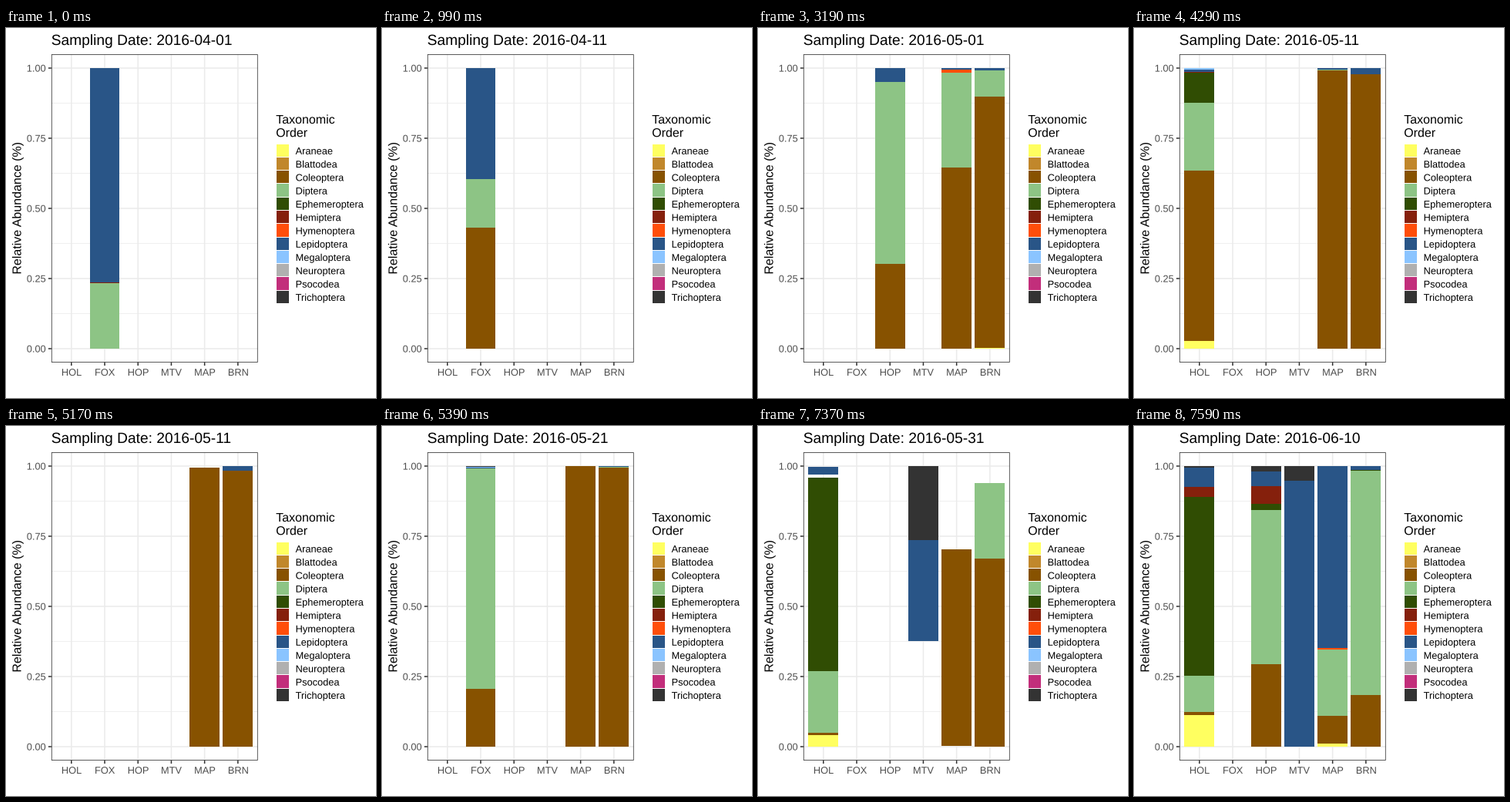
A matplotlib script for the animation above (8000 ms loop, 480 by 480 pixels).

```python
from math import floor

import matplotlib.pyplot as plt
from matplotlib.animation import FuncAnimation
from matplotlib.collections import PolyCollection
from matplotlib.patches import PathPatch, Rectangle
from matplotlib.textpath import TextPath
from matplotlib.transforms import Affine2D

SIZE, DPI = 480, 72          # at 72 dpi one point is one pixel
LOOP, INTERVAL = 8000, 20    # ms
STEP = 110                   # ms per animation step
HOLD, CYCLE = 8, 10          # steps at rest, steps per date

LEFT, RIGHT, TOP, BOTTOM = 58.9, 326.7, 34, 434
Y0, Y_SPAN = 416, 364
X0, PITCH = 84.84, 43.2
SITES = ["HOL", "FOX", "HOP", "MTV", "MAP", "BRN"]

ORDERS = {
    "A": ("Araneae", "#FFFF60"),
    "B": ("Blattodea", "#C1872B"),
    "C": ("Coleoptera", "#875200"),
    "D": ("Diptera", "#8DC485"),
    "E": ("Ephemeroptera", "#304D03"),
    "H": ("Hemiptera", "#85200C"),
    "Y": ("Hymenoptera", "#FF4E0A"),
    "L": ("Lepidoptera", "#295587"),
    "M": ("Megaloptera", "#8AC4FF"),
    "N": ("Neuroptera", "#B0B0B0"),
    "P": ("Psocodea", "#C22E7B"),
    "T": ("Trichoptera", "#333333"),
}

# Cumulative top of each stacked order, per site
SAMPLES = [
    ("2016-04-01", dict(FOX=dict(D=.2335, H=.2375, L=1))),
    ("2016-04-11", dict(FOX=dict(C=.43, D=.605, L=1))),
    ("2016-04-21", dict(
        FOX=dict(C=.86, D=.975, E=.978, L=1),
        MAP=dict(C=.041, D=.5907, L=1),
        BRN=dict(C=.033, D=.236, H=.2445, L=1))),
    ("2016-05-01", dict(
        HOP=dict(C=.302, D=.9505, L=1),
        MAP=dict(C=.6456, D=.9835, Y=.9945, L=1),
        BRN=dict(A=.003, C=.898, D=.992, L=1))),
    ("2016-05-11", dict(
        HOL=dict(A=.0275, C=.6346, D=.8764, E=.9835, H=.9863, L=.9945, M=1),
        MAP=dict(C=.992, D=.9945, L=1),
        BRN=dict(C=.978, L=1))),
    ("2016-05-21", dict(
        FOX=dict(C=.206, D=.991, L=.9945, M=.9973, T=1),
        MAP=dict(C=1),
        BRN=dict(C=.9945, D=.9973, L=1))),
    ("2016-05-31", dict(
        HOL=dict(A=.0055, C=.0137, D=.2775, E=.992, L=1),
        FOX=dict(C=.871, L=1),
        MTV=dict(B=.0055, C=.558, D=.563, H=.566, L=.632, T=1),
        MAP=dict(C=1),
        BRN=dict(C=.912, D=.9176, Y=1))),
    ("2016-06-10", dict(
        HOL=dict(A=.1126, C=.1236, D=.2527, E=.89, H=.926, L=.9945, T=1),
        HOP=dict(C=.294, D=.8434, E=.8654, H=.9286, L=.981, T=1),
        MTV=dict(L=.948, T=1),
        MAP=dict(A=.011, C=.11, D=.346, Y=.3516, L=1),
        BRN=dict(C=.184, D=.9835, E=.986, L=1))),
]


def segments(sample):
    """Map (site, order) to its (bottom, top) share."""
    out = {}
    for site, stack in sample.items():
        low = 0
        for key, high in stack.items():
            out[site, key] = low, high
            low = high
    return out


DATES = [date for date, _ in SAMPLES]
STACKS = [segments(sample) for _, sample in SAMPLES]


def site_x(site):
    return X0 + PITCH * SITES.index(site)


def share_y(share):
    return Y0 - Y_SPAN * share


fig = plt.figure(figsize=(SIZE / DPI, SIZE / DPI), dpi=DPI, facecolor="white")
ax = fig.add_axes([0, 0, 1, 1])
ax.set(xlim=(0, SIZE), ylim=(SIZE, 0))
ax.axis("off")


def line(xs, ys, color, width, z):
    ax.plot(xs, ys, color=color, lw=width, zorder=z, snap=False,
            solid_capstyle="butt")


def text_path(x, y, text, size, align=0, angle=0):
    """Outline of a text; align is 0 for left, .5 for centre, 1 for right."""
    path = TextPath((0, 0), text, size=size,
                    prop={"family": "Liberation Sans"})
    shift = -align * path.get_extents().x1
    place = Affine2D().translate(shift, 0).rotate_deg(angle)
    return place.scale(1, -1).translate(x, y).transform_path(path)


def label(x, y, text, size, color="black", **kw):
    patch = PathPatch(text_path(x, y, text, size, **kw), fc=color, lw=0,
                      zorder=6, snap=False)
    return ax.add_patch(patch)


GRID, DARK, TICK_TEXT = "#EBEBEB", "#333333", "#4D4D4D"
TITLE_AT, TITLE_SIZE = (58.7, 22), 19.2

# Grid, ticks and axis labels
for i in range(5):
    y = share_y(i / 4)
    line([LEFT, RIGHT], [y, y], GRID, 1.55, 1)
    line([LEFT - 4, LEFT], [y, y], DARK, 1.55, 4)
    label(51.2, y + 4.6, f"{i / 4:.2f}", 12.8, TICK_TEXT, align=1)
    if i < 4:
        mid = share_y((i + .5) / 4)
        line([LEFT, RIGHT], [mid, mid], GRID, .78, 1)
for site in SITES:
    x = site_x(site)
    line([x, x], [TOP, BOTTOM], GRID, 1.55, 1)
    line([x, x], [BOTTOM, BOTTOM + 4], DARK, 1.55, 4)
    label(x, 451, site, 12.8, TICK_TEXT, align=.5)

ax.add_patch(Rectangle((LEFT + .4, TOP + .4), RIGHT - LEFT - .8,
                       BOTTOM - TOP - .8, fill=False, ec=DARK, lw=.8,
                       zorder=5, snap=False))
label(19.5, 234.3, "Relative Abundance (%)", 16, align=.5, angle=90)
title = label(*TITLE_AT, f"Sampling Date: {DATES[0]}", TITLE_SIZE)

# Legend
KEY_TOP, KEY_SIZE, KEY_STEP = 151.1, 16.28, 17.28
label(350.2, 124, "Taxonomic", 16)
label(350.2, 141.2, "Order", 16)
for i, (name, color) in enumerate(ORDERS.values()):
    y = KEY_TOP + KEY_STEP * i
    top, bottom = floor(y), floor(y + KEY_SIZE)
    ax.add_patch(Rectangle((351, top), 16, bottom - top, fc=color, lw=0,
                           antialiased=False))
    label(375.6, y + KEY_SIZE / 2 + 4.6, name, 12.8)

bars = PolyCollection([], linewidths=0, edgecolors="none",
                      antialiaseds=False, zorder=3)
ax.add_collection(bars, autolim=False)


def blend(a, b, f):
    """Move the shared segments; the others wait for the next rest."""
    return {k: tuple(p + (q - p) * f for p, q in zip(a[k], b[k]))
            for k in a if k in b}


def box(site, low, high):
    x = site_x(site)
    x0, x1 = round(x - .45 * PITCH), round(x + .45 * PITCH)
    y0, y1 = round(share_y(low)), round(share_y(high))
    return [(x0, y0), (x1, y0), (x1, y1), (x0, y1)]


TITLES = [text_path(*TITLE_AT, f"Sampling Date: {date}", TITLE_SIZE)
          for date in DATES]


def draw(n):
    t = n * INTERVAL + INTERVAL // 2
    i, phase = divmod(t // STEP + 1, CYCLE)
    stack, nearest = STACKS[i], i
    if phase >= HOLD:
        f = (phase - HOLD + 1) / (CYCLE - HOLD + 1)
        stack = blend(stack, STACKS[i + 1], f)
        nearest = i + (f > .5)
    bars.set_verts([box(site, *span) for (site, _), span in stack.items()])
    bars.set_facecolor([ORDERS[key][1] for _, key in stack])
    title.set_path(TITLES[nearest])
    return bars, title


anim = FuncAnimation(fig, draw, frames=LOOP // INTERVAL, interval=INTERVAL,
                     repeat=True, repeat_delay=0)
plt.show()
```
